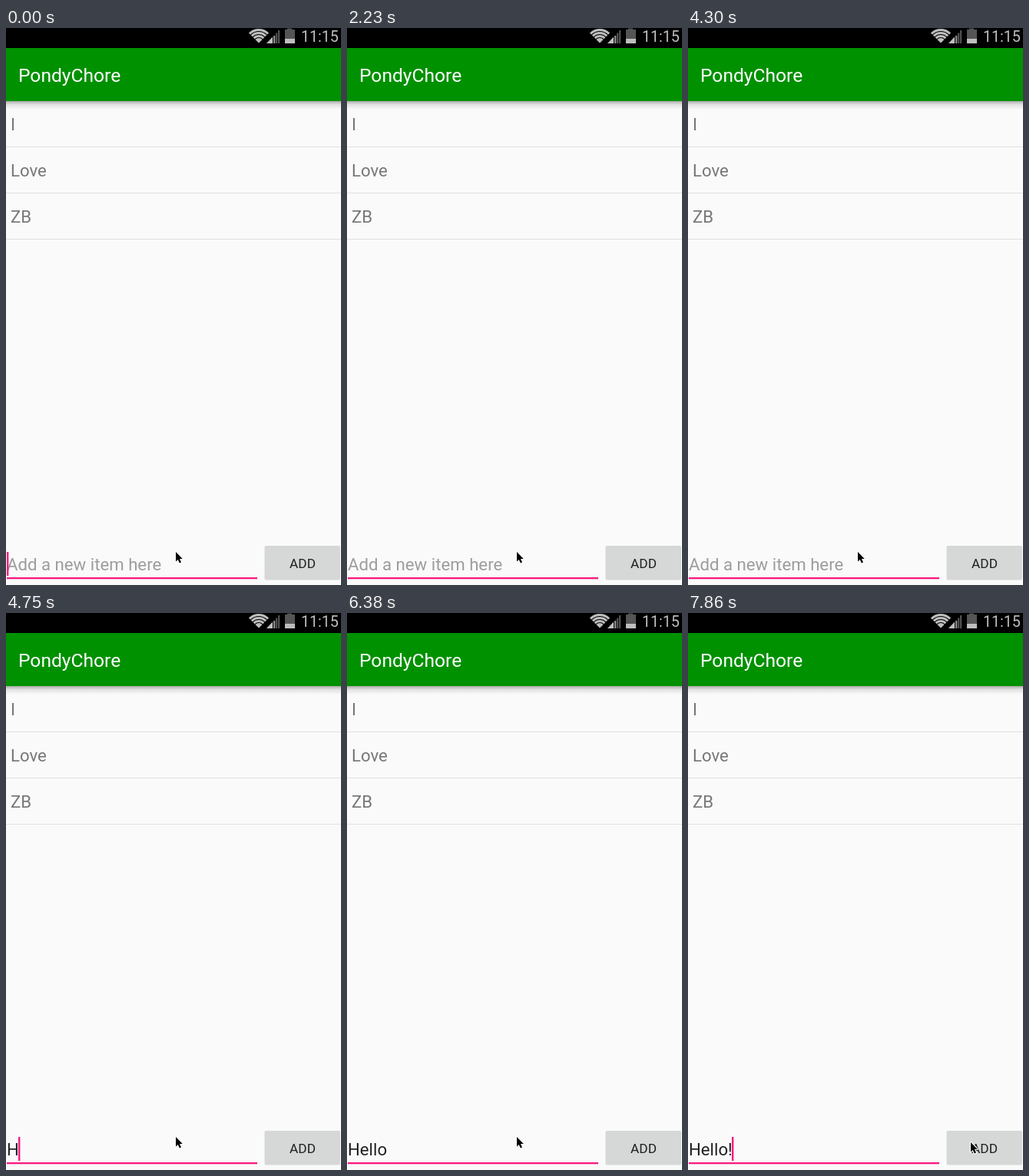
Write an HTML page with a canvas that moves like this. It is 436 px wide and 724 px high and loops after 8000 ms.

```html
<!DOCTYPE html>
<html lang="en">
<head>
<meta charset="utf-8">
<title>To-do list</title>
<style>
  html, body { margin: 0; width: 100%; height: 100%; overflow: hidden; background: #fafafa; }
  canvas { display: block; }
</style>
</head>
<body>
<canvas id="stage" width="436" height="724"></canvas>
<script>
const ctx = document.getElementById('stage').getContext('2d');
const LOOP = 8000;
const PINK = '#fb1a80';
const BODY = 22.2;

const caretToggles = [300, 750, 1340, 1790, 2230, 2830, 3270, 3710, 4300, 4750,
                      5480, 5630, 6380, 6820, 7420, 7860];
const keyPresses = [4750, 5040, 5630, 5780, 5930, 6970];
const pointerStops = [[0, 221, 681], [7420, 223, 681], [7560, 309, 688],
                      [7710, 363, 688], [7860, 368, 688]];

const countUntil = (times, t) => times.filter(time => time <= t).length;

function rect(x, y, w, h, color) {
  ctx.fillStyle = color;
  ctx.fillRect(x, y, w, h);
}

function text(str, x, y, size, color, align = 'left') {
  ctx.font = `${size}px Roboto, sans-serif`;
  ctx.textAlign = align;
  ctx.fillStyle = color;
  ctx.fillText(str, x, y);
}

function polygon(points, color) {
  ctx.beginPath();
  points.forEach(([x, y]) => ctx.lineTo(x, y));
  ctx.closePath();
  ctx.fillStyle = color;
  ctx.fill();
}

function wifi(x, y) {
  const from = -Math.PI * 0.75, to = -Math.PI * 0.25;
  ctx.beginPath();
  ctx.moveTo(x, y);
  ctx.arc(x, y, 6.5, from, to);
  ctx.fillStyle = '#bebebe';
  ctx.fill();
  ctx.strokeStyle = '#bebebe';
  ctx.lineWidth = 3;
  for (const radius of [9, 13, 17]) {
    ctx.beginPath();
    ctx.arc(x, y, radius, from, to);
    ctx.stroke();
  }
}

function statusBar() {
  rect(0, 0, 436, 26, '#000');
  wifi(329, 19.5);
  polygon([[339, 20], [347, 11.5], [347, 20]], '#bebebe');
  for (let i = 0; i < 3; i++) {
    const x = 348 + i * 3, top = 10 - i * 3.5;
    rect(x, top, 2.3, 20 - top, i ? '#505050' : '#8c8c8c');
  }
  rect(366, 0.5, 6, 2, '#555');
  rect(363, 2, 13, 18, '#555');
  rect(363, 14, 13, 6, '#bebebe');
  text('11:15', 384, 18, 19.6, '#bebebe');
}

function appBar() {
  const shadow = ctx.createLinearGradient(0, 95, 0, 106);
  shadow.addColorStop(0, 'rgba(0,0,0,.32)');
  shadow.addColorStop(0.4, 'rgba(0,0,0,.1)');
  shadow.addColorStop(1, 'rgba(0,0,0,0)');
  rect(0, 95, 436, 11, shadow);
  rect(0, 26, 436, 69, '#009100');
  text('PondyChore', 16, 70, 24.6, '#fff');
}

function itemList() {
  ['I', 'Love', 'ZB'].forEach((item, i) => {
    text(item, 6, 133 + i * 60, BODY, '#777');
    rect(0, 154 + i * 60, 436, 1, '#e0e0e0');
  });
}

function inputField(t) {
  const typed = 'Hello!'.slice(0, countUntil(keyPresses, t));
  text(typed || 'Add a new item here', 1, 705, BODY, typed ? '#212121' : '#9d9d9d');
  if (countUntil(caretToggles, t) % 2 === 0) {
    rect(1 + Math.floor(ctx.measureText(typed).width), 681, 2.4, 31, PINK);
  }
  rect(1, 714, 326, 2.3, PINK);
}

function addButton() {
  ctx.beginPath();
  ctx.roundRect(336.5, 673, 98.5, 44.5, 2);
  ctx.fillStyle = '#d6d7d7';
  ctx.fill();
  text('ADD', 386, 702, 17.25, '#212121', 'center');
}

function pointer(t) {
  const [, x, y] = pointerStops.findLast(([time]) => time <= t);
  ctx.save();
  ctx.translate(x, y);
  polygon([[0, 0], [0, 12.5], [2.8, 10], [4.8, 14.5], [7, 13.6], [5, 9], [8.8, 9]], '#000');
  ctx.globalCompositeOperation = 'source-over';
  ctx.strokeStyle = '#fff';
  ctx.lineWidth = 2;
  ctx.lineJoin = 'round';
  ctx.stroke();
  ctx.fill();
  ctx.restore();
}

function draw(now) {
  const t = now % LOOP;
  rect(0, 0, 436, 724, '#fafafa');
  statusBar();
  appBar();
  itemList();
  inputField(t);
  addButton();
  pointer(t);
  requestAnimationFrame(draw);
}
requestAnimationFrame(draw);
</script>
</body>
</html>
```
